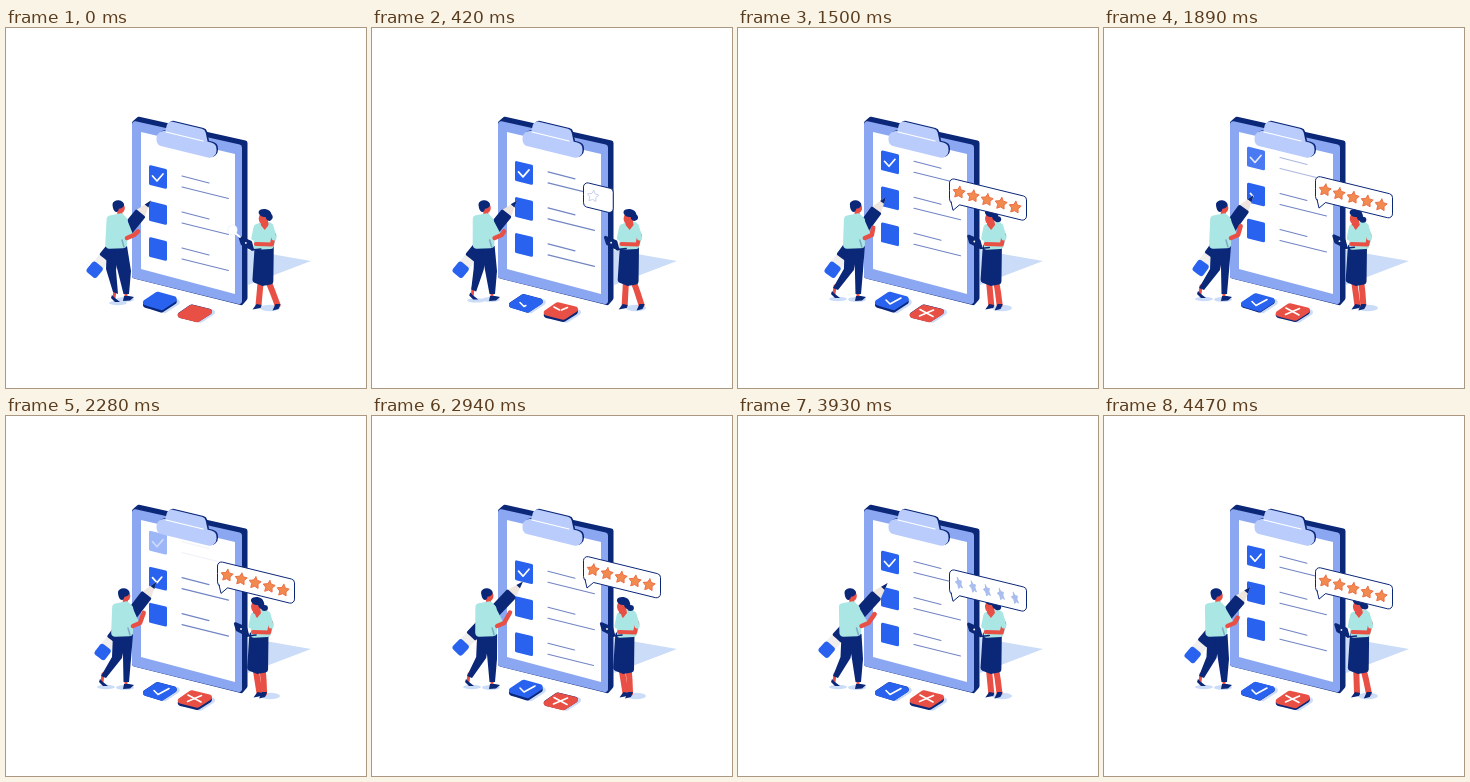
An HTML page with a canvas that plays this animation: 360x360 px, repeating every 4500 ms.

```html
<!DOCTYPE html>
<html lang="en">
<head>
<meta charset="utf-8">
<title>Checklist and rating</title>
<style>
html, body { margin: 0; width: 100%; height: 100%; overflow: hidden; background: #fff; }
canvas { display: block; width: 100%; height: 100%; }
</style>
</head>
<body>
<canvas id="stage" width="360" height="360"></canvas>
<script>
const ctx = document.getElementById('stage').getContext('2d');
const LOOP = 4500;
const NAVY = '#0b2778', BLUE = '#2862ef', PERI = '#8ba7f2', PALE = '#b9ccfb',
  MINT = '#aae6e3', RED = '#e84f45', SHADE = '#cbdcf8', WHITE = '#fff', RULE = '#7285c4';
const SLOPE = 0.245;

const clamp = v => Math.max(0, Math.min(1, v));
const ramp = (t, a, b) => clamp((t - a) / (b - a));
const ease = v => v * v * (3 - 2 * v);
const mix = (a, b, k) => a + (b - a) * k;
// Rises from a to b, holds, falls from c to d.
const swell = (t, a, b, c, d) => ease(ramp(t, a, b)) * (1 - ease(ramp(t, c, d)));
const shift = (points, dx, dy) => points.map(p => [p[0] + dx, p[1] + dy]);

function poly(points, fill) {
  ctx.beginPath();
  points.forEach(p => ctx.lineTo(p[0], p[1]));
  ctx.closePath();
  ctx.fillStyle = fill;
  ctx.fill();
}

function roundPoly(points, r, fill, stroke, width = 1) {
  const n = points.length, a = points[0], z = points[n - 1];
  ctx.beginPath();
  ctx.moveTo((a[0] + z[0]) / 2, (a[1] + z[1]) / 2);
  points.forEach((p, i) => {
    const q = points[(i + 1) % n];
    ctx.arcTo(p[0], p[1], q[0], q[1], r);
  });
  ctx.closePath();
  if (fill) { ctx.fillStyle = fill; ctx.fill(); }
  if (stroke) { ctx.strokeStyle = stroke; ctx.lineWidth = width; ctx.stroke(); }
}

function line(points, color, width) {
  ctx.beginPath();
  points.forEach(p => ctx.lineTo(p[0], p[1]));
  ctx.strokeStyle = color;
  ctx.lineWidth = width;
  ctx.stroke();
}

// Draws the leading part of a polyline, k from 0 to 1.
function trace(points, k, color, width) {
  if (k <= 0) return;
  const dist = i => Math.hypot(points[i][0] - points[i - 1][0], points[i][1] - points[i - 1][1]);
  let left = 0;
  for (let i = 1; i < points.length; i++) left += dist(i) * k;
  const out = [points[0]];
  for (let i = 1; i < points.length && left > 0; i++) {
    const f = Math.min(1, left / dist(i));
    out.push([mix(points[i - 1][0], points[i][0], f), mix(points[i - 1][1], points[i][1], f)]);
    left -= dist(i);
  }
  line(out, color, width);
}

function oval(x, y, rx, ry, fill, turn = 0) {
  ctx.beginPath();
  ctx.ellipse(x, y, rx, ry, turn, 0, 7);
  ctx.fillStyle = fill;
  ctx.fill();
}

const slanted = (x, y, w, h) =>
  [[x, y], [x + w, y + w * SLOPE], [x + w, y + w * SLOPE + h], [x, y + h]];

function board() {
  poly([[242, 222], [305, 233], [242, 257]], SHADE);
  roundPoly([[126, 94], [132, 88.5], [241.5, 113], [241.5, 271], [236, 277.5], [126, 250]], 2.5, NAVY);
  roundPoly([[126, 92.5], [236, 117], [236, 277], [126, 250]], 3, PERI);
  poly([[135, 104], [229, 126], [229, 266], [135, 241]], WHITE);
}

function clipPart() {
  const lobe = [[157, 112], [162, 92.5], [199, 101.5], [203, 120]];
  const band = slanted(150.5, 101, 60, 16);
  for (const [d, color] of [[1.5, NAVY], [0, PALE]]) {
    roundPoly(shift(band, d, -d / 2), 7, color);
    roundPoly(shift(lobe, d, -d / 2), 5, color);
  }
  line([[160, 104], [197, 113]], WHITE, 1.2);
}

function rows(t) {
  for (let i = 0; i < 4; i++) {
    const y = 149 - 0.0098 * t + 36 * i;
    const enter = i === 3 ? ramp(t, 2400, 2800) : 1;
    const alpha = clamp((y - 122) / 10) * enter;
    if (!alpha) continue;
    ctx.globalAlpha = alpha;
    roundPoly(slanted(143, y - 12.2, 18, 20), 1.5, BLUE);
    const check = i === 0 ? 1 : i === 1 ? ramp(t, 1750, 2350) : 0;
    trace([[146.5, y - 1], [151, y + 4], [157, y - 3]], check, WHITE, 1.7);
    ctx.globalAlpha = alpha * clamp((y - 125) / 8);
    const grow = i === 3 ? ease(ramp(t, 2300, 3000)) : 1;
    trace([[176, y - 1], [203, y + 6]], grow, RULE, 1.1);
    trace([[176, y + 10], [222.5, y + 21.5]], grow, RULE, 1.1);
  }
  ctx.globalAlpha = 1;
}

function card(points, lift, face, marks, drawn) {
  const rise = 2 - 2.5 * lift;
  roundPoly(shift(points, 3, 2.5), 3, SHADE);
  roundPoly(shift(points, 0, 1.8), 3, NAVY);
  roundPoly(shift(points, 0, rise), 3, face);
  marks.forEach(m => trace(shift(m, 0, rise), drawn, WHITE, 1.6));
}

function cards(t) {
  const wave = 1.6 * Math.cos((t - 3200) / 1770 * 2 * Math.PI);
  const drawn = ease(ramp(t, 150, 750));
  card([[133, 276], [151, 264], [175, 270.5], [156, 283]], clamp(0.5 + wave), BLUE,
    [[[148, 272.5], [152, 276.5], [163, 270.5]]], drawn);
  card([[167.5, 286.5], [185, 274.5], [210.5, 280.5], [192, 292.5]], clamp(0.5 - wave), RED,
    [[[182, 279.5], [195, 286.5]], [[195.5, 280], [181.5, 286]]], drawn);
}

function pencil(tail, tip) {
  const len = Math.hypot(tip[0] - tail[0], tip[1] - tail[1]);
  ctx.save();
  ctx.translate(tail[0], tail[1]);
  ctx.rotate(Math.atan2(tip[1] - tail[1], tip[0] - tail[0]));
  poly([[len - 18, -6], [len, 0], [len - 18, 6]], '#f0e6e0');
  poly([[len - 7, -2.4], [len, 0], [len - 7, 2.4]], NAVY);
  poly([[6, -6], [16, -6], [16, 6], [6, 6]], '#f1eeee');
  roundPoly([[15, -6.2], [len - 16, -6.2], [len - 16, 6.2], [15, 6.2]], 1.5, NAVY);
  roundPoly([[-6.5, -6.5], [7, -6.5], [7, 6.5], [-6.5, 6.5]], 3, BLUE);
  ctx.restore();
}

function man(t) {
  const lean = swell(t, 800, 1600, 2400, 3450);
  const start = 1 - ease(ramp(t, 0, 700));
  const reach = swell(t, 300, 2600, 3450, 5000);
  const hx = 112.8 + 5.5 * lean;
  const hip = 113.5 + 3.5 * lean - 2.5 * start;
  const fx = 96 + 12 * start, fy = 266 + 4 * start;
  const tip = [145 + 6 * reach, 172.5 - 7 * reach];
  const tail = [88.5 + 8 * swell(t, 700, 1900, 2300, 2950), 242 - 10.5 * swell(t, 1500, 2950, 3450, 5000)];
  oval(fx + 4, fy + 5, 9, 2.2, SHADE);
  oval(119, 271.5, 9, 2.4, SHADE);
  pencil(tail, tip);

  line([[fx + 1, fy - 8], [fx, fy]], RED, 3);
  line([[120, 261], [120, 269]], RED, 3);
  poly([[hip - 10, 218], [hip + 3, 218], [hip - 1, 242], [fx + 4, fy - 4], [fx - 1, fy - 6], [hip - 11, 241]], NAVY);
  poly([[hip - 4, 218], [hip + 10, 218], [125, 243], [123, 266], [117.5, 266], [hip, 240]], NAVY);
  poly([[fx - 2, fy - 3], [fx + 1, fy], [fx + 6, fy + 4], [fx + 1, fy + 4], [fx - 3, fy]], NAVY);
  poly([[118, 268], [123, 268], [128, 269], [124, 272.5], [117, 273]], NAVY);

  line([[hx + 1, 180], [hx + 1, 189]], RED, 5);
  const top = hx - 1;
  roundPoly([[top - 11, 188], [top + 4, 185], [top + 10, 191], [hip + 10, 220], [hip - 12, 221]], 4, MINT);
  line([[top + 5, 193], [hip + 11, 206]], MINT, 9);
  line([[hip + 10, 210], [hip + 17, 207], [tip[0] - 13, tip[1] + 31]], RED, 4.5);
  line([[hip + 5, 212], [hip + 7, 219]], '#7fa9c8', 1.5);
  oval(hx + 2, 180, 4, 5, RED);
  oval(hx - 0.5, 176.5, 5.8, 4.2, NAVY, 0.1);
  oval(hx - 3, 179, 3, 5, NAVY, -0.2);
}

function woman(t) {
  const stride = 1 - swell(t, -300, 2400, 2900, 6100);
  const hx = 251 + 8 * stride, cx = 255 + 3 * stride, sx = 252.5 + 5.5 * stride;
  const lx = 253.5 - stride, rx = 258 + 14 * stride, ry = 278;
  oval(264, 280, 10, 3.2, SHADE);
  line([[sx - 3, 252], [lx, 277]], RED, 6);
  line([[sx + 4, 252], [sx + 5 + 4 * stride, 264], [rx, ry - 1]], RED, 6);
  poly([[lx - 2, 276], [lx + 3, 277], [lx + 2, 280], [lx - 6, 281.5]], NAVY);
  poly([[rx - 2, ry - 2], [rx + 3, ry - 2], [rx + 1, ry + 3], [rx - 5, ry + 4.5]], NAVY);
  roundPoly([[sx - 9, 216], [sx + 10, 216], [sx + 9.5, 256], [sx - 1, 258], [sx - 11.5, 254]], 3, NAVY);

  roundPoly([[cx - 10, 197], [cx - 2, 194], [cx + 7, 194], [cx + 13, 208], [cx + 9, 221], [cx - 10, 222]], 3, MINT);
  poly([[hx - 3, 190], [hx + 3, 192], [hx + 4, 197], [hx, 202], [hx - 4, 197]], RED);
  line([[cx + 10, 207], [cx + 8, 216.5], [cx - 8, 216]], RED, 4);
  line([[cx + 7, 198], [cx + 10, 210]], MINT, 5);
  line([[cx - 8, 200], [cx - 10, 210]], MINT, 5);
  const dx = 5 * stride, dy = 2 * stride;
  roundPoly(shift([[227, 205], [241, 211], [244, 222], [230, 215]], dx, dy), 1.5, NAVY);
  line(shift([[241, 220], [250, 219]], dx, dy), NAVY, 1.6);
  oval(235 + dx, 213 + dy, 0.9, 0.9, WHITE);

  oval(hx - 1, 190.5, 5, 6.2, RED, 0.1);
  oval(hx, 185, 6.2, 4, NAVY, 0.15);
  oval(hx + 4, 188, 3.2, 5, NAVY, -0.15);
  oval(hx + 7.5 - 3 * stride, 192 - 3 * stride, 3.4, 3, NAVY);
}

function star(x, y, r, squeeze, fill, stroke) {
  ctx.save();
  ctx.translate(x, y);
  ctx.rotate(-0.7 * (1 - squeeze));
  ctx.scale(squeeze, 1);
  ctx.beginPath();
  for (let i = 0; i < 10; i++) {
    const a = i * Math.PI / 5 - Math.PI / 2 + 0.12, d = i % 2 ? r * 0.53 : r;
    ctx.lineTo(d * Math.cos(a), d * Math.sin(a));
  }
  ctx.closePath();
  ctx.restore();
  ctx.fillStyle = fill;
  ctx.fill();
  ctx.strokeStyle = stroke;
  ctx.lineWidth = 1;
  ctx.stroke();
}

function bubble(t, start) {
  const age = t - start;
  const alpha = ramp(age, 0, 90) * (1 - ramp(age, 3260, 3480));
  if (!alpha) return;
  const y = 155 - 19 * Math.pow(age / 3240, 1.7);
  const grow = ease(ramp(age, 120, 560));
  const width = mix(19, 77, grow);
  ctx.globalAlpha = alpha;
  roundPoly(slanted(211.5, y - 1, width, 24.5), 4, WHITE, NAVY, 1);
  if (grow > 0.3) {
    poly([[213.5, y + 22], [222, y + 24], [222, y + 26], [215, y + 32]], WHITE);
    line([[213, y + 23], [215, y + 31.5], [221.5, y + 26]], NAVY, 1);
  }
  for (let i = 0; i < 5; i++) {
    const sx = 221 + 14 * i, sy = y + 13.5 + 3.75 * i;
    if (sx + 6 > 211 + width) break;
    const flip = ramp(age, 400, 900);
    const squeeze = 0.4 + 0.6 * Math.abs(Math.cos(flip * Math.PI));
    const tint = ramp(age, 700, 900);
    if (flip === 0) star(sx, sy, 6, 1, WHITE, '#c8d1ee');
    else if (tint < 1) star(sx, sy, 6.5, squeeze, '#a9bdee', '#a9bdee');
    if (tint > 0) star(sx, sy, 6.3 * ease(tint), squeeze, '#f28a50', '#ea6f45');
  }
  ctx.globalAlpha = 1;
}

function puff(t) {
  ctx.globalAlpha = 1 - ramp(t, 0, 180);
  oval(226.5, 202, 5, 5.5, '#edf1fd');
  oval(226.5, 202, 4.2, 4.7, WHITE);
  line([[229, 205], [234, 209]], WHITE, 2);
  ctx.globalAlpha = 1;
}

function draw() {
  const t = performance.now() % LOOP;
  ctx.fillStyle = WHITE;
  ctx.fillRect(0, 0, 360, 360);
  ctx.lineJoin = 'round';
  ctx.lineCap = 'round';
  board();
  rows(t);
  clipPart();
  cards(t);
  man(t);
  woman(t);
  puff(t);
  bubble(t, 180);
  bubble(t, 3300);
  requestAnimationFrame(draw);
}
draw();
</script>
</body>
</html>
```
